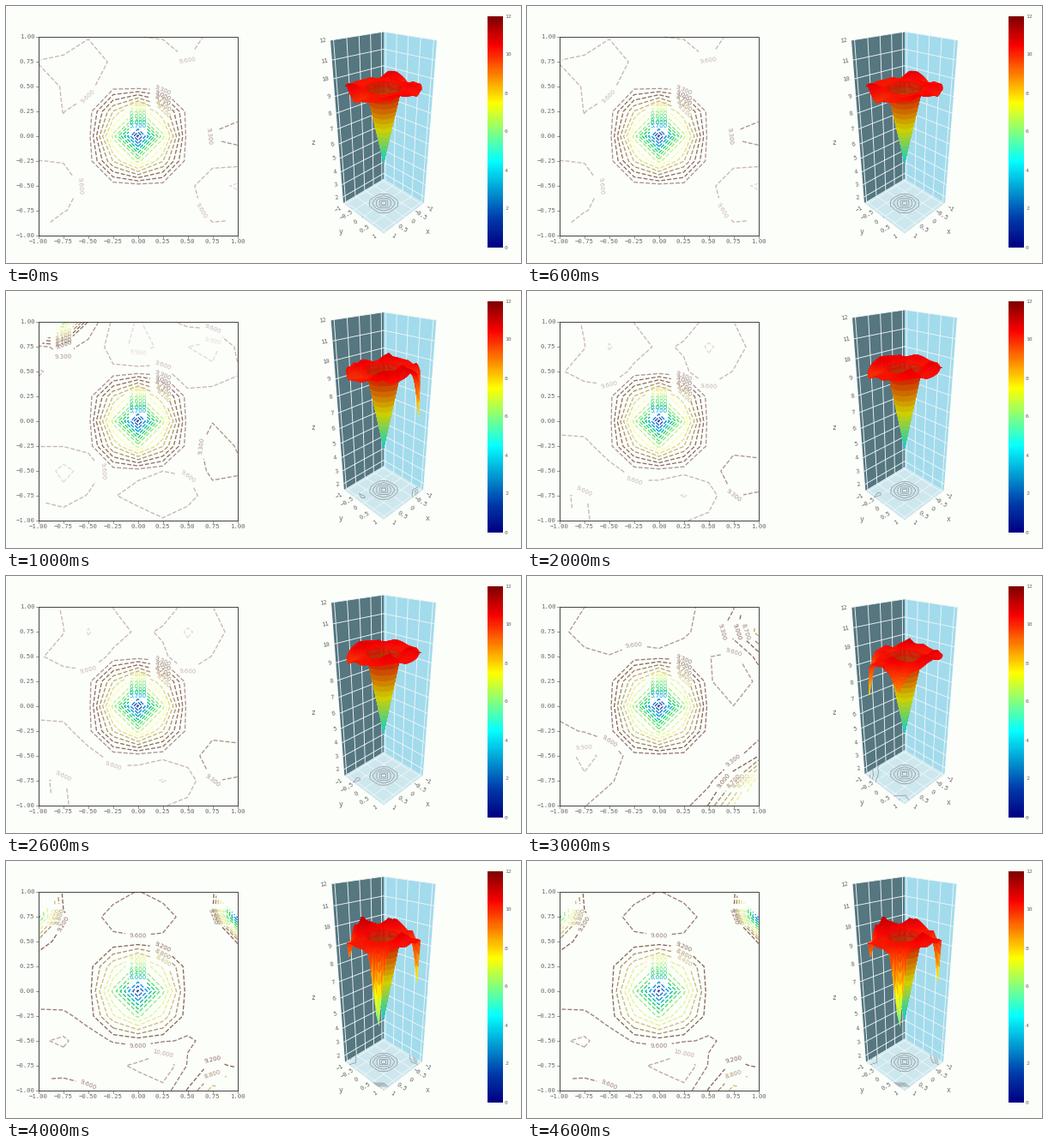
A matplotlib script that plays this animation: 600 px wide and 300 px high, repeating every 5 s.

```python
import matplotlib.pyplot as plt
import numpy as np
from matplotlib.animation import FuncAnimation
from matplotlib.collections import LineCollection, PolyCollection
from matplotlib.colors import LinearSegmentedColormap
from matplotlib.patches import Rectangle

BG, INK = "#fcfefa", "#6a6a6a"
PX = 0.72  # points per pixel at 100 dpi
LEFT, TOP, SIDE = 38, 36.3, 231.5
Z_LOW, Z_HIGH = 1.5, 12
TIP, RIM = 4.7, 9.48
JET = LinearSegmentedColormap.from_list("jet_bar", [
    (0, "#000083"), (0.125, "#003caa"), (0.375, "#05ffff"),
    (0.625, "#ffff00"), (0.875, "#fa0000"), (1, "#800000")])

# box growth, level step, seed, then hills and pits as (x, y, height)
SCENES = [
    (0.0, 0.3, 3, [(-0.65, 0.7, 0.35), (-0.9, -0.5, 0.35), (0.9, -0.55, 0.4),
                   (0.5, 1, 0.3), (1, 0, -0.3)]),
    (0.45, 0.3, 8, [(-0.75, 1, -2.9), (0, 0.8, 0.6), (0.65, 0.65, 0.6),
                    (-0.75, -0.5, 0.55), (0.25, -0.65, 0.5), (0.85, -0.35, -0.4)]),
    (0.67, 0.3, 12, [(-0.5, 0.75, 0.5), (0.5, 0.75, 0.6), (0.25, -0.75, 0.5),
                     (-0.35, -0.75, 0.4), (-0.95, -0.4, 0.3), (0.85, -0.6, -0.4)]),
    (0.26, 0.3, 21, [(-0.6, 0.75, 0.35), (0, 0.85, 0.4), (0.75, 0.4, 0.4),
                     (-0.75, -0.55, 0.5), (1, 0.75, -1.2), (1, -0.75, -2.2),
                     (0.75, -1, -1.5)]),
    (1.0, 0.4, 5, [(0, 0.75, 0.5), (-0.85, -0.5, 0.7), (0.25, -0.75, 0.9),
                   (-0.3, -0.7, 0.5), (-1, 0.75, -2.8), (1, 0.75, -4.4),
                   (0.75, -1, -1.2)]),
]

fig = plt.figure(figsize=(6, 3), dpi=100, facecolor=BG)
ax = fig.add_axes([0, 0, 1, 1])
GX, GY = np.meshgrid(np.linspace(-1, 1, 9), np.linspace(-1, 1, 9))


def text(x, y, s, size=7.3, ha="center", rot=0):
    ax.text(x, y, s, fontsize=size * PX, color=INK, ha=ha, va="center",
            rotation=rot, rotation_mode="anchor", family="DejaVu Sans Mono")


def signed(v, spec):
    return format(v, spec).replace("-", "\u2212")


# ---- the sampled landscape ------------------------------------------

def cone(r):
    return TIP + (RIM - TIP) * np.minimum(r / 0.5, 1)


def relief(seed, bumps):
    """Roughness of the plateau on the 9 x 9 grid."""
    rough = np.random.default_rng(seed).normal(0, 0.07, GX.shape)
    for x, y, height in bumps:
        size = 0.22 / (1 + 0.25 * abs(height))
        rough += height * np.exp(-((GX - x) ** 2 + (GY - y) ** 2) / (2 * size ** 2))
    return rough * np.clip((np.hypot(GX, GY) - 0.5) / 0.2, 0, 1)


def bilinear(grid, x, y):
    u, v = (np.clip(4 * (c + 1), 0, 8) for c in (x, y))
    i, j = (np.minimum(c.astype(int), 7) for c in (u, v))
    u, v = u - i, v - j
    return ((1 - v) * ((1 - u) * grid[j, i] + u * grid[j, i + 1])
            + v * ((1 - u) * grid[j + 1, i] + u * grid[j + 1, i + 1]))


# ---- left: contour map ----------------------------------------------

def contour_map(z, step):
    x, y = LEFT + SIDE * (GX + 1) / 2, TOP + SIDE * (1 - GY) / 2
    levels = np.arange(4.8, z.max() + 1.5 * step, step)
    cs = ax.contour(x, y, z, levels=levels, cmap="terrain",
                    linestyles="dashed", linewidths=0.95)
    ax.clabel(cs, fontsize=7 * PX, fmt="%.3f")
    ax.add_patch(Rectangle((LEFT, TOP), SIDE, SIDE, fill=False,
                           ec="#333333", lw=0.65, zorder=6))
    for k in range(9):
        v, shift = -1 + k / 4, SIDE * k / 8
        x, y, base = LEFT + shift, TOP + SIDE - shift, TOP + SIDE
        ax.plot([x, x], [base, base + 3], color=INK, lw=0.5)
        ax.plot([LEFT - 3, LEFT], [y, y], color=INK, lw=0.5)
        text(x, 275, signed(v, ".2f"))
        text(33.5, y, signed(v, ".2f"), ha="right")


# ---- right: perspective box -----------------------------------------

class Box:
    """p runs right, q runs towards the viewer, z runs up."""

    def __init__(self, tall):
        self.a_x = 47 - 2 * tall
        self.a_y = 0.67 * self.a_x
        self.y0 = 230 + 4.5 * tall
        self.b = 1 - self.a_x / (62 - 1.5 * tall)
        self.c = (self.y0 - 40 + 13.5 * tall) * (1 - self.b)
        back_top = 30 - 12 * tall
        self.a = (self.a_y + self.c) / (self.y0 - back_top) - 1 + self.b

    def __call__(self, p, q, z):
        h = (z - Z_LOW) / (Z_HIGH - Z_LOW)
        w = 1 - self.a * q - self.b * h
        return 440 + self.a_x * p / w, self.y0 + (self.a_y * q - self.c * h) / w, w

    def face(self, color, *corners):
        ax.add_patch(plt.Polygon([self(*v)[:2] for v in corners], fc=color, ec="none"))

    def walls(self):
        grid, ticks = [], np.linspace(0.05, 0.95, 5)
        for s, color in ((-1, "#567680"), (1, "#a2dbec")):
            self.face(color, (s, 0, Z_LOW), (0, -1, Z_LOW), (0, -1, Z_HIGH), (s, 0, Z_HIGH))
            for u in ticks:
                foot = (s * (1 - u), -u, Z_LOW)
                grid.append([foot, (s * (1 - u), -u, Z_HIGH)])
                grid.append([foot, (-s * u, 1 - u, Z_LOW)])
            grid += [[(s, 0, z), (0, -1, z)] for z in range(2, 13)]
        self.face("#cde7ee", (-1, 0, Z_LOW), (0, -1, Z_LOW), (1, 0, Z_LOW), (0, 1, Z_LOW))
        lines = [[self(*v)[:2] for v in pair] for pair in grid]
        ax.add_collection(LineCollection(lines, colors="#eef6f7", linewidths=0.65))

        for z in range(2, 13):
            x, y, _ = self(-1, 0, z)
            text(x - 5, y, str(z), 7, ha="right", rot=10)
        for u in ticks:
            name = signed(round((u - 0.5) / 0.45 * 2) / 2, "g")
            for s in (-1, 1):
                x, y, _ = self(s * (1 - u), u, Z_LOW)
                text(x + s * 8, y + 5, name, 7, rot=-32 * s)
        text(358, 160, "z", 8)
        text(390, self.y0 + 33, "y", 8)
        text(491, self.y0 + 33, "x", 8)

    def floor_rings(self, z):
        x, y, _ = self((GY - GX) / 2, (GX + GY) / 2, Z_LOW)
        ax.contour(x, y, z, levels=np.linspace(5.8, 9.2, 5), colors="#929a9d",
                   linewidths=0.55)

    def surface(self, rough):
        r, th = np.meshgrid(np.linspace(0, 1.08, 33), np.linspace(0, 2 * np.pi, 97))
        far = r + 0.17 * np.clip((r - 0.5) / 0.58, 0, 1)
        z = cone(r) + bilinear(rough, far * np.cos(th), far * np.sin(th))
        p = r * (np.sin(th) - np.cos(th)) / 2
        q = r * (np.sin(th) + np.cos(th)) / 2

        def corners(m):
            return np.stack([m[:-1, :-1], m[1:, :-1], m[1:, 1:], m[:-1, 1:]],
                            -1).reshape(-1, 4)

        x, y, w = self(p, q, z)
        quads = np.stack([corners(x), corners(y)], -1)
        zm, rm, qm = (corners(m).mean(1) for m in (z, r, q))
        steep = np.clip((0.54 - rm) / 0.08, 0, 1)
        shade = 1 - steep * np.where(qm < 0, 0.25, 0.18)
        rgb = JET(np.clip((zm - 1) / 9.9, 0, 0.92))[:, :3] * shade[:, None]
        order = np.argsort(-corners(w).mean(1))
        ax.add_collection(PolyCollection(quads[order], facecolors=rgb[order],
                                         edgecolors=rgb[order], linewidths=0.3,
                                         zorder=5))


def color_bar():
    ax.imshow(np.linspace(1, 0, 256)[:, None], cmap=JET, vmin=0, vmax=1,
              extent=(561, 579, 282, 12), aspect="auto")
    for v in range(0, 13, 2):
        text(581, 282 - 22.5 * v, str(v), 6.5, ha="left")


def draw(i):
    tall, step, seed, bumps = SCENES[i]
    ax.clear()
    ax.axis("off")
    ax.set(xlim=(0, 600), ylim=(300, 0))
    ax.autoscale(False)

    rough = relief(seed, bumps)
    radius = np.hypot(GX, GY)
    z = np.ma.masked_where(radius > 1.3, cone(radius) + rough)
    contour_map(z, step)
    color_bar()
    box = Box(tall)
    box.walls()
    box.floor_rings(z)
    box.surface(rough)


anim = FuncAnimation(fig, draw, frames=len(SCENES), interval=1000, repeat=True)
plt.show()
```
